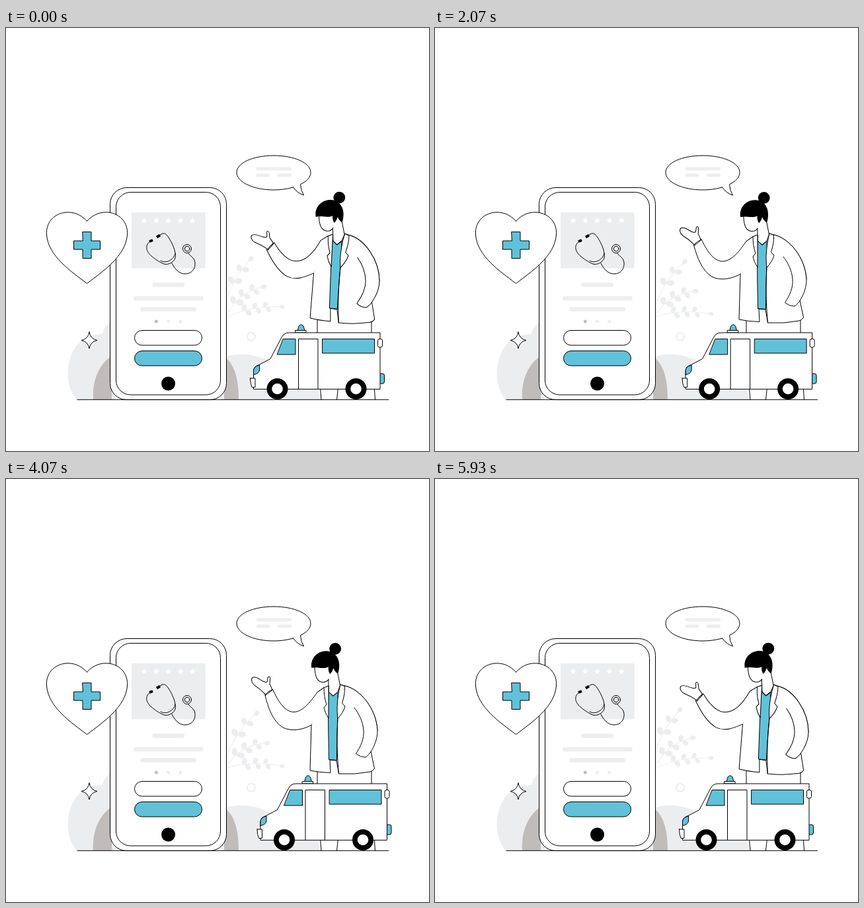
Recreate the animation shown at these times as an HTML page. Size 640x640 px, loop 6000 ms.

```html
<!DOCTYPE html>
<html lang="en">
<head>
<meta charset="utf-8">
<title>Medical app</title>
<style>
  html, body { margin: 0; width: 100%; height: 100%; overflow: hidden; background: #fff; }
  svg { display: block; width: 100vw; height: 100vh; }
  .ln { fill: none; stroke: #000; stroke-width: 1; stroke-linejoin: round; stroke-linecap: round; }
  .wh { fill: #fff; }
  .bl { fill: #61c1d9; }
  .bk { fill: #000; }
  .pale { fill: #ecedef; }
  .tan { fill: #c0bcba; }
  .bar { fill: none; stroke: #eeeeef; stroke-linecap: round; }
</style>
</head>
<body>
<svg viewBox="0 0 640 640">
  <!-- hills -->
  <path class="pale" d="M107 562C92 546 89 514 101 490C110 472 126 463 146 463C148 453 154 446 166 443V562Z"/>
  <path class="pale" d="M325 562V500C343 492 366 492 386 499C405 505 414 515 424 526C448 524 472 536 476 562Z"/>
  <path class="tan" d="M132 562C130 535 140 509 160 496V562Z"/>
  <path class="tan" d="M330 562V497C344 507 352 527 352 562Z"/>

  <g id="plants"></g>
  <circle cx="371" cy="467" r="6" fill="none" stroke="#ecedef" stroke-width="2"/>
  <path class="ln wh" d="M126 460Q127.500 470.500 138 472.500Q127.500 474.500 126 485Q124.500 474.500 114 472.500Q124.500 470.500 126 460Z"/>

  <!-- phone -->
  <rect class="ln wh" x="157.500" y="241.500" width="176" height="321" rx="25"/>
  <rect class="ln wh" x="166.500" y="248.500" width="158" height="306.500" rx="22"/>
  <rect class="pale" x="190" y="279" width="111.500" height="84.500"/>
  <g id="stars" fill="#fff"></g>
  <g class="ln">
    <path d="M219 322C210 328 211 337 220 345C227 351 234 355 239 357C244 359 254 355 256 348C258 340 252 326 246 317C241 309 237 309 231 315"/>
    <path d="M234 352C242 357 254 351 256 341"/>
    <path d="M251 356C257 368 264 372 271 372C281 372 287 364 286 355C285 346 278 346 276 340.500"/>
    <circle cx="274" cy="334" r="6.500"/>
    <circle cx="274" cy="334" r="3.700"/>
    <path stroke-width="4" style="stroke-width:4;stroke-linecap:butt" d="M217 323L222 321M228 316.500L233 313.500"/>
  </g>
  <path class="bar" stroke-width="6.500" d="M224.500 388.500H267M196 409H295.500M206.500 425.500H285"/>
  <circle class="tan" cx="227.300" cy="444" r="2.500"/>
  <circle class="pale" cx="245.500" cy="444" r="2.500"/>
  <circle class="pale" cx="263.700" cy="444" r="2.500"/>
  <rect class="ln wh" x="194.500" y="457.500" width="102" height="22.500" rx="11.250"/>
  <rect class="ln bl" x="194.500" y="488.500" width="102" height="22.500" rx="11.250"/>
  <circle class="bk" cx="245.500" cy="538" r="10.500"/>

  <!-- heart -->
  <path class="ln wh" d="M122.500 292C112 281 101 278 90 279C72 281 60 295 61.500 313C64 345 98 368 122.500 386.500C147 368 181 345 183.500 313C185 295 173 281 155 279C144 278 133 281 122.500 292Z"/>
  <path class="ln bl" d="M116 308.500H129V322H142.500V335H129V348.500H116V335H102.500V322H116Z"/>

  <!-- speech bubble -->
  <path class="ln wh" d="M434.500 241C424 244 414 245 405 245C374 245 349 233 349 218.500C349 204 374 193 405 193C436 193 461 204 461 218.500C461 226 455 232 445.500 236.500Q446 246 450.500 253Q441 250 434.500 241Z"/>
  <path class="bar" stroke-width="5" d="M381 213H429.500M381 222.700H397M413 222.700H429.500"/>

  <!-- legs -->
  <path fill="#fff" d="M471 436H553L558.500 562H477Z"/>
  <path class="ln" d="M471 436V470M553 436V470M475 540L477 562M503 540L500.500 562M557 540L558.500 562"/>

  <!-- doctor -->
  <g id="body">
    <g id="head">
      <path class="ln wh" d="M468 280C467 296 470 306 479 307C483 307.500 486 306 488 304L488 330L501 330L506 316L502 290Z" stroke="none" style="stroke:none"/>
      <path class="ln" d="M468 280C467 296 470 306 479 307C483 307.500 486 306 488.500 303"/>
      <path class="ln" d="M502 292L505.500 313M488 303L488 322"/>
      <circle class="bk" cx="499.500" cy="257" r="8.900"/>
      <path class="bk" d="M463 285C461 271 472 259.500 486 260C498 260.500 505 270 505 281C505 287 504 291 502.500 295C499 292 497 289 496 286C495 290 493 293 490.500 295C488.500 291 488 288 488.500 284C481 288 472 283 463 285Z"/>
    </g>
    <path class="ln wh" d="M480.500 316L488 313V322L495 328L502 322L506 311L513 313C536 318 560 347 562 380L552 412L557.500 438Q555 442 551 443Q528 447.500 503.500 446L500 426L490 425L491 444.500Q474 444 460 441L462 372L471 323Z"/>
    <path class="ln bl" d="M488 322L495 328.500L502 322.500C503 350 500.500 385 500.500 425.500L488.500 424.500C488 390 487 350 488 322Z"/>
    <path class="ln wh" d="M481 315.500L488 313L488 362C484 356 482 350 481 346L485 341C482 333 481 324 481 315.500Z"/>
    <path class="ln wh" d="M506 311L512.500 313.500C513 323 511 331 508.500 339L513 344C511 351 507 357 502 362.500C500 350 501 330 506 311Z"/>
    <path class="ln" d="M502 362C500 390 501 420 503.500 446"/>
    <path class="ln wh" d="M513 313C536 318 560 347 562 380C562.500 397 552 416 544 421Q536 421 529.500 415.500C537 404 542 393 541 380C540 367 534 355 527 346" />
    <g id="arm">
      <path id="sleeveFill" fill="#fff"/>
      <path id="sleeve" class="ln"/>
      <g id="hand">
        <path class="ln wh" d="M-5 4C-8 0 -15 -8 -21 -13C-25 -17 -25 -23 -22 -24.500C-16 -26 -12 -20 -7 -17C-4 -15 -1 -14 -.500 -17L1 -22C2 -24 4.500 -23 4 -20L2.500 -12C4 -8 5 -5 5 -2Z"/>
        <path class="ln wh" d="M-6 4.500Q-4 .500 5.500 -3"/>
      </g>
    </g>
  </g>

  <path class="ln" style="stroke-linecap:butt" d="M107.500 562.300H579"/>

  <!-- ambulance -->
  <g id="van">
    <path class="ln bl" d="M441 458L443 451Q446.500 446.500 450 451L452 458Z"/>
    <path class="ln wh" d="M438 457.500H454V461H438Z"/>
    <path class="ln bl" d="M566 523H570Q572.500 523 572.500 526V535Q572.500 538 570 538H566Z"/>
    <path class="ln wh" d="M374.500 546V519Q374.500 512 383 509.500L400 500.500L417 468Q420.500 461 428 461H566V546Z"/>
    <path class="ln bl" d="M419.500 470.500H438V494H410.500Z"/>
    <path class="ln" d="M442.500 546V470.500H472V546"/>
    <rect class="ln bl" x="479" y="470.500" width="78.500" height="21.500"/>
    <path class="ln bl" d="M374.500 524.500V518Q375 512 383.500 510V518Q382 523.500 374.500 524.500Z"/>
    <path class="ln wh" d="M369.500 530H377V543.500H372Q369.500 538 369.500 530Z"/>
    <rect class="ln wh" x="562.500" y="470.500" width="7" height="12.500" rx="2.500"/>
    <circle class="bk" cx="410.500" cy="546" r="16"/>
    <circle class="wh" cx="410.500" cy="546" r="8.300"/>
    <circle class="bk" cx="529.500" cy="546" r="16"/>
    <circle class="wh" cx="529.500" cy="546" r="8.300"/>
  </g>
</svg>

<script>
const LOOP = 6000;
const $ = id => document.getElementById(id);

function add(parent, tag, attrs) {
  const el = document.createElementNS('http://www.w3.org/2000/svg', tag);
  for (const k in attrs) el.setAttribute(k, attrs[k]);
  parent.appendChild(el);
  return el;
}

// Rating stars
for (let i = 0; i < 5; i++) {
  const pts = [];
  for (let k = 0; k < 10; k++) {
    const r = k % 2 ? 2.3 : 5, a = k * Math.PI / 5 - Math.PI / 2;
    pts.push((209 + i * 18.3 + r * Math.cos(a)).toFixed(2) + ',' + (291.3 + r * Math.sin(a)).toFixed(2));
  }
  add($('stars'), 'polygon', { points: pts.join(' ') });
}

// A stem with pairs of leaves that get smaller toward the tip
function branch([x0, y0, x1, y1, x2, y2], spots, size) {
  const g = add($('plants'), 'g', {});
  add(g, 'path', { d: `M${x0} ${y0}Q${x1} ${y1} ${x2} ${y2}`, fill: 'none', stroke: '#ecedef' });
  const leaf = (u, side) => {
    const v = 1 - u, s = size * (1.1 - 0.35 * u);
    const x = v * v * x0 + 2 * v * u * x1 + u * u * x2;
    const y = v * v * y0 + 2 * v * u * y1 + u * u * y2;
    const dir = Math.atan2(v * (y1 - y0) + u * (y2 - y1), v * (x1 - x0) + u * (x2 - x1)) * 180 / Math.PI;
    add(g, 'path', {
      class: 'pale',
      d: `M0 0C${s * .2} ${-s * .45} ${s * .9} ${-s * .5} ${s} 0C${s * .9} ${s * .5} ${s * .2} ${s * .45} 0 0Z`,
      transform: `translate(${x} ${y}) rotate(${dir + side * 55})`
    });
  };
  spots.forEach(u => { leaf(u, -1); leaf(u + 0.05, 1); });
  leaf(0.96, 0);
  return g;
}
const plants = [
  { el: branch([333, 414, 345, 376, 369, 351], [.38, .68], 13), turn: 6.7, at: '318 440' },
  { el: branch([333, 437, 350, 400, 388, 392], [.3, .52, .76], 12.5), turn: 10, at: '335 430' },
  { el: branch([333, 438, 370, 420, 417, 422], [.33, .52, .7], 11), turn: 10.6, at: '335 428' }
];

// Motion tables: [time, value], eased between stops
const vanStops = [[0, 0], [1150, 11], [1300, 11], [2700, 0], [2950, 0], [4250, 11], [4400, 11], [5930, 0], [6000, 0]];
const armStops = [[0, 0], [1050, 1], [1600, 1], [2700, 0], [3250, 0], [4550, 1], [4700, 1], [5900, 0], [6000, 0]];
const leanStops = [[0, 1], [1100, 0], [4750, 0], [5930, 1], [6000, 1]];

function ease(stops, t) {
  let i = 1;
  while (i < stops.length - 1 && t > stops[i][0]) i++;
  const [t0, a] = stops[i - 1], [t1, b] = stops[i];
  return a + (b - a) * (1 - Math.cos(Math.PI * (t - t0) / (t1 - t0))) / 2;
}

// Sleeve control points, arm lowered and raised
const low = [470, 323, 458, 347, 445, 358, 430, 356, 418, 354, 408, 342, 400, 330, 389, 341, 397, 356, 408, 373, 422, 380, 436, 386, 450, 379, 462, 373];
const high = [471, 323, 461, 334, 449, 352, 435, 351, 421, 349, 412, 331, 405, 313, 393, 320, 396, 341, 402, 364, 417, 374, 430, 381, 448, 380, 462, 372];

function drawArm(q) {
  const p = low.map((v, i) => (v + (high[i] - v) * q).toFixed(2));
  const pt = i => p[2 * i] + ' ' + p[2 * i + 1];
  const inner = `M480.500 316L${pt(0)}C${pt(1)} ${pt(2)} ${pt(3)}C${pt(4)} ${pt(5)} ${pt(6)}`;
  const outer = `${pt(7)}C${pt(8)} ${pt(9)} ${pt(10)}C${pt(11)} ${pt(12)} ${pt(13)}`;
  $('sleeveFill').setAttribute('d', `${inner}L${outer}Z`);
  $('sleeve').setAttribute('d', `${inner}L${outer}`);
  $('hand').setAttribute('transform', `translate(${395 + 4 * q} ${335.5 - 19 * q}) rotate(${-21 * (1 - q)})`);
}

function draw(t) {
  const q = ease(armStops, t);
  const sway = (1 - Math.cos(2 * Math.PI * t / 3000)) / 2;
  $('van').setAttribute('transform', `translate(${ease(vanStops, t)} 0)`);
  $('body').setAttribute('transform', `rotate(${2.9 * ease(leanStops, t)} 505 442)`);
  $('head').setAttribute('transform', `rotate(${-4.8 * (1 - q)} 495 312)`);
  plants.forEach(p => p.el.setAttribute('transform', `rotate(${p.turn * sway} ${p.at})`));
  drawArm(q);
}

const start = performance.now();
function tick() {
  draw((performance.now() - start) % LOOP);
  requestAnimationFrame(tick);
}
tick();
</script>
</body>
</html>
```
